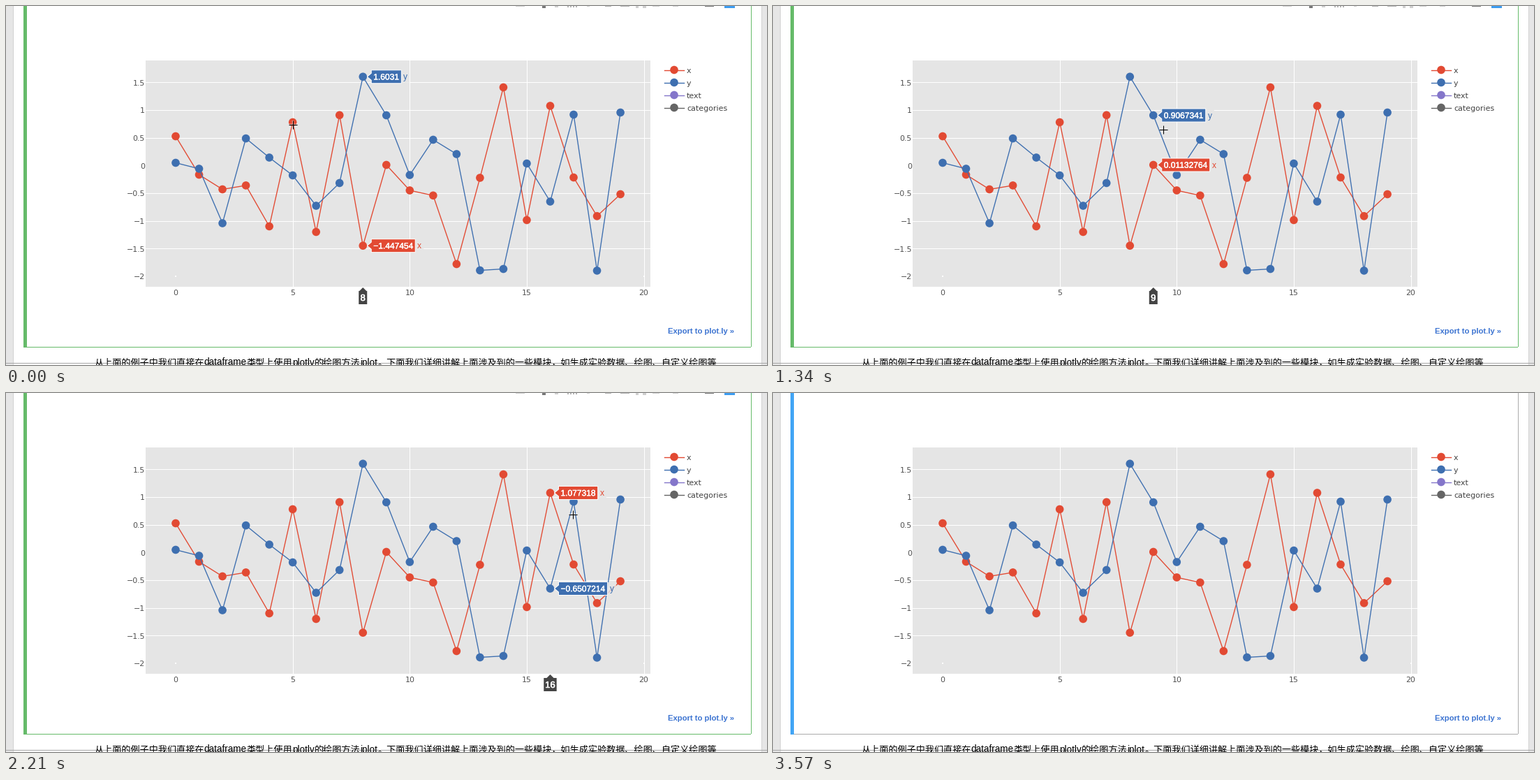
A matplotlib script that plays this animation: 1090x514 px, repeating every 3630 ms.

```python
import numpy as np
import matplotlib.pyplot as plt
import matplotlib.patheffects as pe
from matplotlib.animation import FuncAnimation
from matplotlib.patches import Circle, Polygon, Rectangle

W, H, DPI = 1090, 514, 100
LOOP, STEP = 3630, 30
PX = 72 / DPI
RED, BLUE, PURPLE, GREY = "#e24a33", "#3e6fb0", "#8476ca", "#656565"
PLOT_BG, DARK = "#e5e5e5", "#444444"
MINUS = "\u2212"

X = [0.5283142, -0.1652087, -0.4300916, -0.3595297, -1.098254,
     0.7812465, -1.199071, 0.9094562, -1.447454, 0.01132764,
     -0.4490381, -0.540913, -1.779216, -0.2219453, 1.411277,
     -0.9850742, 1.077318, -0.2156349, -0.9132262, -0.5182067]
Y = [0.04921573, -0.0580342, -1.041637, 0.4894059, 0.1438216,
     -0.1778125, -0.7264318, -0.3159756, 1.6031, 0.9067341,
     -0.1715263, 0.4656283, 0.2068175, -1.892843, -1.867482,
     0.03661528, -0.6507214, 0.9193427, -1.897894, 0.9571382]

# Cursor path: time, x, y
PATH = np.array([
    (0, 410, 169), (50, 354, 160), (198, 334, 166), (313, 303, 185),
    (427, 303, 189), (599, 342, 184), (771, 372, 182), (1115, 499, 180),
    (1229, 545, 177), (1688, 655, 172), (1917, 753, 165), (2433, 858, 180),
    (2605, 876, 243), (2777, 905, 400), (2950, 930, 524)])

# Hovered point: start time, index (-1 for none)
HOVER = [(0, 8), (50, 6), (198, 5), (255, 4), (313, 3), (427, 2), (541, 3),
         (771, 4), (886, 5), (1000, 6), (1058, 7), (1172, 8), (1229, 9),
         (1400, 10), (1550, 11), (1745, 12), (1800, 13), (1915, 14),
         (2030, 15), (2145, 16), (2260, 17), (2490, 18), (2660, 19),
         (2835, -1)]


def px(i):
    return 243 + 33.53 * i


def py(v):
    return 228.4 - 79.3 * v


def number(v):
    return f"{v:.7g}".replace("-", MINUS)


fig = plt.figure(figsize=(W / DPI, H / DPI), dpi=DPI, facecolor="white")
ax = fig.add_axes([0, 0, 1, 1])
ax.set_xlim(0, W)
ax.set_ylim(H, 0)
ax.axis("off")


def rect(x0, y0, x1, y1, color, z=1, **kw):
    return ax.add_patch(Rectangle((x0, y0), x1 - x0, y1 - y0, fc=color,
                                  lw=0, zorder=z, **kw))


def line(xs, ys, color, width=1, z=2, **kw):
    return ax.plot(xs, ys, color=color, lw=width * PX, zorder=z, **kw)[0]


def label(x, y, s, size, color, font="DejaVu Sans", ha="left",
          va="center_baseline", z=5, **kw):
    return ax.text(x, y, s, fontsize=size * PX, color=color, family=font,
                   ha=ha, va=va, zorder=z, **kw)


def dot(x, y, color, z=4):
    ax.add_patch(Circle((x, y), 5.8, fc=color, lw=0, zorder=z))


def draw_page():
    rect(0, 0, 10, H, "#e6e6e6")
    rect(10, 0, 11, H, "#d2d2d2")
    rect(1082, 0, 1083, H, "#d2d2d2")
    rect(1083, 0, W, H, "#e6e6e6")
    rect(0, 511, W, 512, "#a6a6a6")
    label(1043, 469, "Export to plot.ly »", 11.3, "#3b73d1",
          "Liberation Sans", "right", "baseline", weight="bold")
    parts = [(126, "从上面的例子中我们直接在"), (283, "dataframe"),
             (344, "类型上使用"), (410, "plotly"), (442, "的绘图方法"),
             (507.5, "iplot"),
             (532, "。下面我们详细讲解上面涉及到的一些模块，"
                   "如生成实验数据、绘图、自定义绘图等")]
    for x, s in parts:
        latin = s.isascii()
        label(x, 514.5, s, 13.5 if latin else 13.1, "black",
              "Liberation Sans" if latin else "Noto Sans CJK JP",
              va="baseline")


def draw_chart():
    rect(200, 78, 923, 402, PLOT_BG)
    for v in np.arange(-2, 2, 0.5):
        y = py(v)
        if v not in (0, -2):
            line([200, 923], [y, y], "white")
        label(199, y + 4.3, number(v), 11, "#505050", ha="right",
              va="baseline")
    for i in range(0, 21, 5):
        x = px(i)
        if i:
            line([x, x], [78, 402], "white")
        label(x, 414.5, str(i), 11, "#505050", ha="center", va="baseline")
    for x in (242, 913):
        rect(x, 386, x + 2, 388, "white")
    for data, color, z in ((X, RED, 3), (Y, BLUE, 3.5)):
        pts = [(px(i), py(v)) for i, v in enumerate(data)]
        line(*zip(*pts), color, 1.35, z)
        for x, y in pts:
            dot(x, y, color, z + 0.1)
    rows = zip(("x", "y", "text", "categories"), (RED, BLUE, PURPLE, GREY))
    for k, (name, color) in enumerate(rows):
        y = 91.5 + 18 * k
        line([942.5, 971], [y, y], color, 1.4)
        dot(957, y, color)
        label(975, y + 4.3, name, 11, DARK, va="baseline")


def draw_toolbar():
    """Lower edges of the buttons cut off by the top of the stage."""
    light, mid, dark = "#d0d0d0", "#b4b4b4", "#777777"
    bits = [(730, 743, 1, light), (768, 773, 3, dark), (786, 791, 2, light),
            (832, 836, 1, light), (858, 867, 1, mid), (880, 893, 1, mid),
            (902, 906, 3, light), (912, 917, 3, light), (926, 936, 1, light),
            (955, 963, 1, light), (1001, 1014, 1, dark),
            (1029, 1044, 3, "#3d9cf0")]
    bits += [(x, x + 2, 2, mid) for x in range(804, 819, 4)]
    return [rect(x0, 0, x1, h, c) for x0, x1, h, c in bits]


class Tag:
    """Value label beside a hovered point."""

    def __init__(self, data, color, name):
        self.data = data
        self.back = rect(0, 0, 12, 19, PLOT_BG, 6, alpha=0.8)
        self.shape = ax.add_patch(Polygon([(0, 0)] * 3, fc=color, ec="white",
                                          lw=PX, zorder=7))
        self.value = label(0, 0, "", 12, "white", "Liberation Sans",
                           va="baseline", z=8)
        self.value.set_path_effects([pe.withStroke(linewidth=0.25,
                                                   foreground="white")])
        self.name = label(0, 0, name, 12, color, "Liberation Sans",
                          va="baseline", z=8)
        self.parts = [self.back, self.shape, self.value, self.name]

    def show(self, i):
        for part in self.parts:
            part.set_visible(i >= 0)
        if i < 0:
            return
        x, y = px(i) + 6, py(self.data[i])
        self.value.set_text(number(self.data[i]))
        left = x + 6
        right = left + self.value.get_window_extent().width + 6
        self.shape.set_xy([(x, y), (left, y - 5), (left, y - 9.5),
                           (right, y - 9.5), (right, y + 9.5),
                           (left, y + 9.5), (left, y + 5)])
        self.value.set_position((left + 3, y + 4.2))
        self.name.set_position((right + 3, y + 4.2))
        self.back.set_xy((right, y - 9.5))


class AxisTag:
    """Dark index label under the x axis."""

    def __init__(self):
        self.shape = ax.add_patch(Polygon([(0, 0)] * 3, fc=DARK, lw=0,
                                          zorder=7))
        self.text = label(0, 422, "", 13, "white", "Liberation Sans",
                          "center", "baseline", 8)
        self.text.set_path_effects([pe.withStroke(linewidth=0.4,
                                                  foreground="white")])

    def show(self, i):
        self.shape.set_visible(i >= 0)
        self.text.set_visible(i >= 0)
        if i < 0:
            return
        x, half = px(i), 6 if i < 10 else 9.2
        self.shape.set_xy([(x, 403), (x + 5, 408), (x + half, 408),
                           (x + half, 427), (x - half, 427),
                           (x - half, 408), (x - 5, 408)])
        self.text.set_text(str(i))
        self.text.set_x(x)


draw_page()
draw_chart()
toolbar = draw_toolbar()
bar = rect(25, 0, 30, 489, "white")
edges = [rect(1066.5, 0, 1067.5, 488, "white"),
         rect(30, 487.7, 1067, 488.8, "white")]
tags = [Tag(X, RED, "x"), Tag(Y, BLUE, "y")]
axis_tag = AxisTag()
cursor = [line([0], [0], c, w, z, solid_capstyle="butt")
          for c, w, z in (("white", 2.4, 10), ("black", 1.1, 11))]
cursor[0].set_alpha(0.5)


def tick(t):
    """Time of the latest pointer update."""
    if t < 198:
        return 50 if t >= 50 else 0
    return 198 + 57.3 * int((t - 198) / 57.3)


def update(frame):
    t = frame * STEP + 20
    idle = t >= 3570
    bar.set_facecolor("#42a5f5" if idle else "#66bb6a")
    for edge in edges:
        edge.set_facecolor("#ababab" if idle else "#66bb6a")

    fade = 1 if t < 3050 else 0.5 if t < 3100 else 0
    for bit in toolbar:
        bit.set_alpha(fade)

    point = [i for start, i in HOVER if start <= t][-1]
    for tag in tags + [axis_tag]:
        tag.show(point)

    now = tick(t)
    cx, cy = (np.floor(np.interp(now, PATH[:, 0], PATH[:, k])) + 0.5
              for k in (1, 2))
    for part in cursor:
        part.set_data([cx - 6, cx + 6, np.nan, cx, cx],
                      [cy, cy, np.nan, cy - 6, cy + 6])
        part.set_visible(t < 2960)
    return []


anim = FuncAnimation(fig, update, frames=LOOP // STEP, interval=STEP,
                     init_func=lambda: update(0), repeat=True, blit=False)
plt.show()
```
